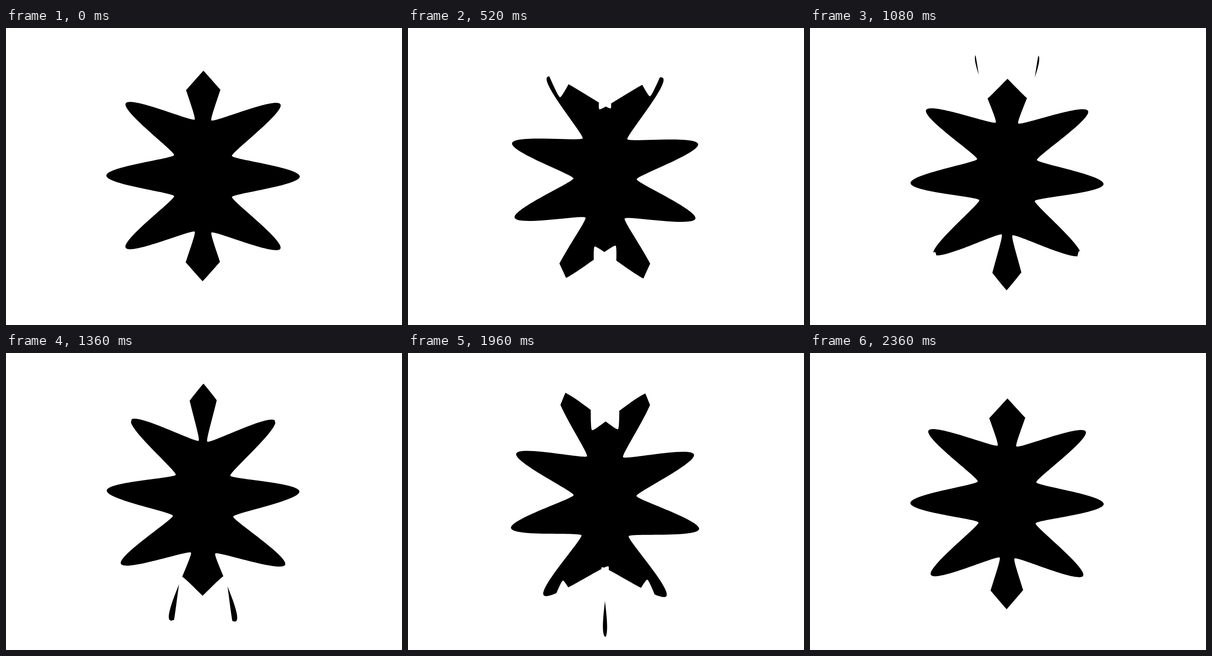
An HTML page with a canvas for the animation above (2.4 s loop, 864 px wide and 648 px high).

```html
<!DOCTYPE html>
<html lang="en">
<head>
<meta charset="utf-8">
<title>Counter-rotating stars</title>
<style>
  html, body { margin: 0; width: 100%; height: 100%; overflow: hidden; background: #fff; }
  canvas { display: block; }
</style>
</head>
<body>
<canvas id="stage" width="864" height="648"></canvas>
<script>
const ctx = document.getElementById('stage').getContext('2d');
const POINTS = 12, OUTER = 315, INNER = 173;
const TIP_HANDLE = 19.6, NOTCH_HANDLE = 8;
const SECTOR = 2 * Math.PI / POINTS;
const PERIOD = 1200, STEP = 40;

// Point at radius r along angle a, shifted sideways by s
const at = (r, s, a) => [
  r * Math.cos(a) - s * Math.sin(a),
  r * Math.sin(a) + s * Math.cos(a)
];

function makeStar() {
  const path = new Path2D();
  path.moveTo(...at(INNER, 0, -SECTOR / 2));
  for (let i = 0; i < POINTS; i++) {
    const tip = i * SECTOR, before = tip - SECTOR / 2, after = tip + SECTOR / 2;
    path.bezierCurveTo(
      ...at(INNER, NOTCH_HANDLE, before),
      ...at(OUTER, -TIP_HANDLE, tip),
      ...at(OUTER, 0, tip));
    path.bezierCurveTo(
      ...at(OUTER, TIP_HANDLE, tip),
      ...at(INNER, -NOTCH_HANDLE, after),
      ...at(INNER, 0, after));
  }
  path.closePath();
  return path;
}

const star = makeStar();

function drawStar(x, y, angle, mode) {
  ctx.save();
  ctx.globalCompositeOperation = mode;
  ctx.translate(x, y);
  ctx.rotate(angle);
  ctx.fill(star);
  ctx.restore();
}

// Only the overlap of the two stars stays visible
function draw(ms) {
  const turn = Math.floor(ms % PERIOD / STEP) * STEP / PERIOD * SECTOR;
  ctx.clearRect(0, 0, 864, 648);
  drawStar(534, 322, turn, 'source-over');
  drawStar(326, 324, -turn, 'source-in');
}

let start;
function tick(now) {
  start ??= now;
  draw(Math.max(0, now - start));
  requestAnimationFrame(tick);
}
draw(0);
requestAnimationFrame(tick);
</script>
</body>
</html>
```
